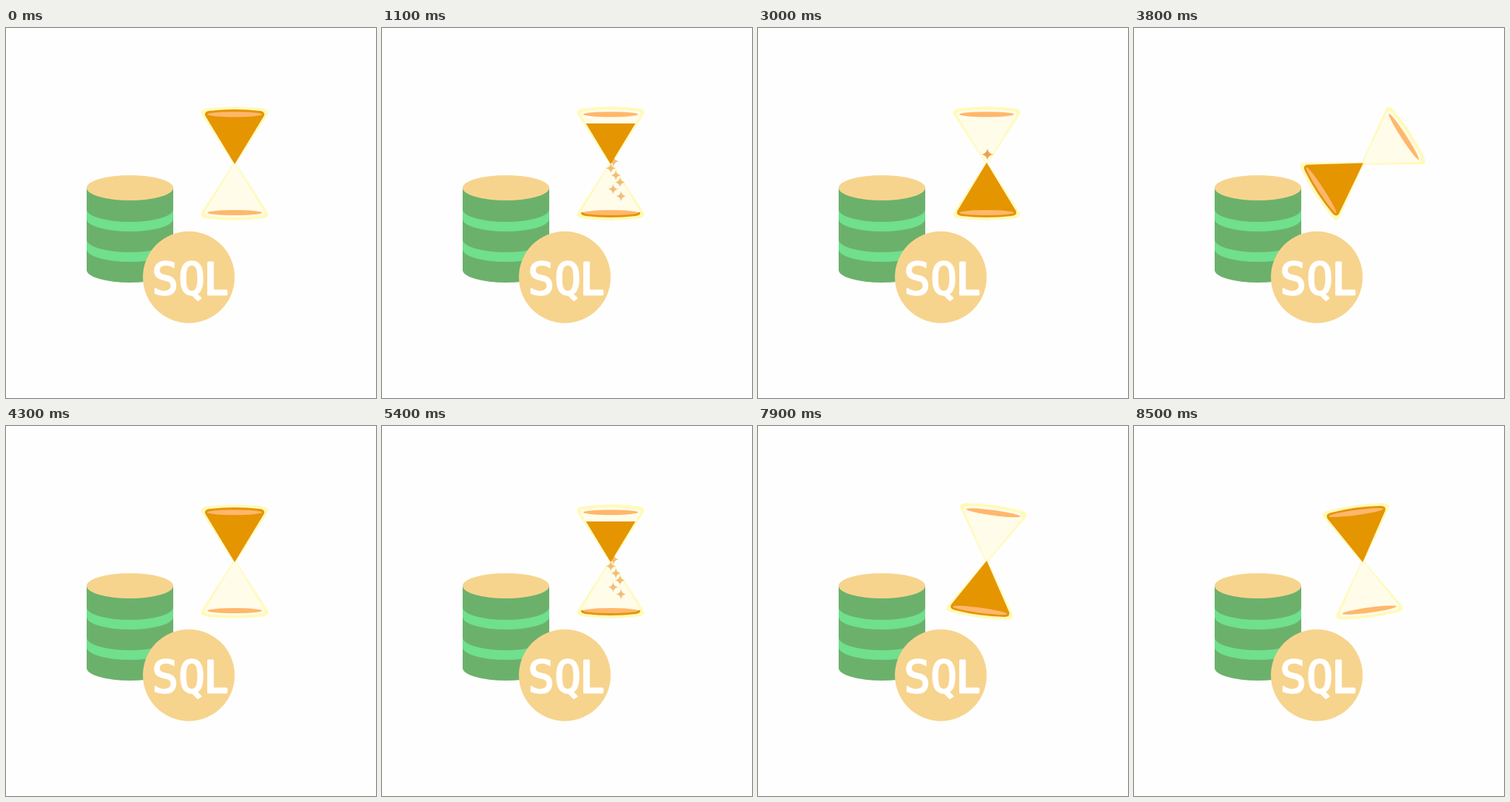
Animation of 500x500 px, one loop 8610 ms. Source, as an HTML page:

```html
<!DOCTYPE html>
<html lang="en">
<head>
<meta charset="utf-8">
<title>SQL hourglass</title>
<style>
  html, body { margin: 0; width: 100%; height: 100%; overflow: hidden; background: #fefefe; }
  svg { display: block; width: 100%; height: 100%; }
  .gold { fill: #f7d48d; }
  .band { fill: #70df8e; }
  .sand { fill: #e59500; }
  .rim { fill: #ffb76c; }
  .label { font: 60px "DejaVu Sans Mono", monospace; fill: #fff; stroke: #fff; stroke-width: 2; stroke-linejoin: round; }
  .label tspan { font-family: Lato, sans-serif; stroke-width: 3; }
</style>
</head>
<body>
<svg viewBox="0 0 500 500">
  <defs>
    <path id="cone" d="M309 184 L269.5 119 Q267 113 275 112 Q309 108 343 112 Q351 113 348.5 119Z"/>
    <g id="glass">
      <path fill="#fffab9" d="M309 186 L264.5 117 Q261 110 272 108.5 Q309 104 346 108.5 Q357 110 353.5 117Z"/>
      <use href="#cone" fill="#fffce9"/>
    </g>
    <path id="spark" d="M0 -8 Q1 -1 8 0 Q1 1 0 8 Q-1 1 -8 0 Q-1 -1 0 -8Z"/>
    <clipPath id="upperClip"><rect id="upperLevel" x="250" width="120" height="90"/></clipPath>
    <clipPath id="lowerClip"><rect id="lowerLevel" x="250" width="120" height="90"/></clipPath>
  </defs>

  <!-- database -->
  <path fill="#6bb16c" d="M109 216 V327 A58.5 17 0 0 0 226 327 V216Z"/>
  <path id="band" class="band" d="M109 245 A58.5 17 0 0 0 226 245 V258 A58.5 17 0 0 1 109 258Z"/>
  <use href="#band" y="41"/>
  <ellipse class="gold" cx="167.5" cy="216" rx="58.5" ry="17"/>

  <!-- badge -->
  <circle class="gold" cx="247" cy="336.7" r="62"/>
  <text class="label" x="197" y="360">SQ<tspan x="268">L</tspan></text>

  <!-- hourglass -->
  <g id="hourglass">
    <use href="#glass"/>
    <use href="#glass" transform="rotate(180 309 183)"/>
    <g id="sparks" fill="#eba34a"></g>
    <g clip-path="url(#upperClip)"><use href="#cone" class="sand"/></g>
    <g clip-path="url(#lowerClip)"><use href="#cone" class="sand" transform="rotate(180 309 183)"/></g>
    <ellipse class="rim" cx="309" cy="116.7" rx="37" ry="3.5"/>
    <ellipse class="rim" cx="309" cy="249.6" rx="37" ry="3.5"/>
  </g>
</svg>
<script>
  const LOOP = 8610, CYCLE = 4300, STEP = 100, FALL = 700;
  const byId = id => document.getElementById(id);
  const progress = (t, from, to) => Math.min(1, Math.max(0, (t - from) / (to - from)));
  const smooth = p => p * p * (3 - 2 * p);

  // A steady stream of falling grains, then one last straggler.
  const drifts = [-2, 14, 3, 18, 12];
  const grains = Array.from({ length: 22 }, (_, i) => ({
    start: 350 + i * 100, drift: drifts[i % 5], size: 0.85, opacity: 0.7
  }));
  grains.push({ start: 2950, drift: 0, size: 1, opacity: 1 });

  for (const grain of grains) {
    grain.node = document.createElementNS("http://www.w3.org/2000/svg", "use");
    grain.node.setAttribute("href", "#spark");
    grain.node.setAttribute("opacity", grain.opacity);
    byId("sparks").append(grain.node);
  }

  function draw(time) {
    // The picture advances in tenths of a second.
    const now = Math.min(8500, Math.floor((time % LOOP) / STEP) * STEP);
    const t = now % CYCLE;

    const drained = progress(t, 500, 2800);
    byId("upperLevel").setAttribute("y", drained < 1 ? 110 + 73 * drained : 300);
    byId("upperLevel").setAttribute("height", 76);
    const filled = progress(t, 900, 2800);
    byId("lowerLevel").setAttribute("y", 257 - 75 * filled);

    for (const { node, start, drift, size } of grains) {
      const p = (t - start) / FALL;
      node.style.display = p >= 0 && p < 1 ? "" : "none";
      node.setAttribute("transform", `translate(${310 + drift * p} ${166 + 66 * p}) scale(${size})`);
    }

    const angle = 180 * smooth(progress(t, 3500, 4300));
    byId("hourglass").setAttribute("transform", `rotate(${angle} 309 183)`);
  }

  const origin = performance.now();
  function tick() {
    draw(performance.now() - origin);
    requestAnimationFrame(tick);
  }
  tick();
</script>
</body>
</html>
```
